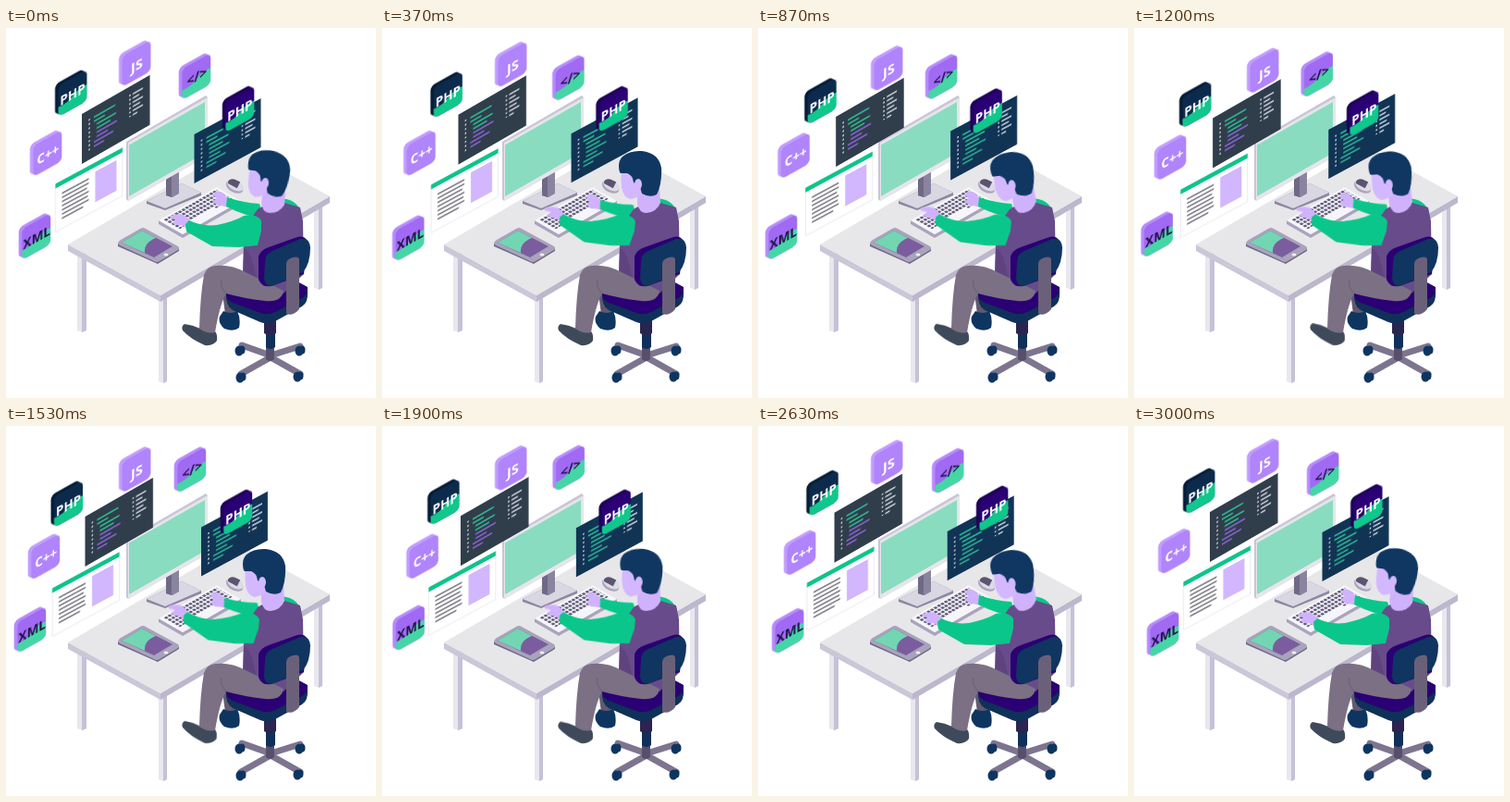
Animation of 400x400 px, one loop 3030 ms. Source, as an HTML page without scripts:

```html
<!DOCTYPE html>
<html lang="en">
<head>
<meta charset="utf-8">
<title>Developer at work</title>
<style>
html, body { margin: 0; width: 100%; height: 100%; overflow: hidden; background: #fff; }
svg { display: block; width: 100vw; height: 100vh; }
text { font: 600 13.5px "Noto Sans", "Open Sans", sans-serif; text-anchor: middle; fill: #fff; }
.ink { fill: #1d1546; }

/* floating parts: half a cycle out, half a cycle back */
.x, .y, .drift { animation: 1515ms cubic-bezier(.37,0,.63,1) infinite alternate; }
.x { animation-name: x; }
.y { animation-name: y; }
.drift { animation-name: drift; }
@keyframes x { from { transform: translateX(var(--a)); } to { transform: translateX(var(--b)); } }
@keyframes y { from { transform: translateY(var(--a)); } to { transform: translateY(var(--b)); } }
@keyframes drift { to { transform: translate(var(--dx), var(--dy)); } }
.wide.x { --a: 1px; --b: -6.6px; animation-delay: -400ms; }
.wide.y { --a: 2px; --b: -7px; animation-delay: -2545ms; }
.slow.x { --a: 2.2px; --b: -4.7px; animation-delay: -600ms; }
.slow.y { --a: 0px; --b: 6.3px; animation-delay: -2850ms; }

.head, .near, .far, .foot { animation: 3030ms ease-in-out infinite; }
.head { animation-name: head; transform-origin: 286px 190px; }
.near { animation-name: near; transform-origin: 270px 218px; }
.far { animation-name: far; transform-origin: 275px 202px; }
.foot { animation-name: foot; transform-origin: 224px 326px; }
@keyframes head {
  0%, 100% { transform: rotate(8deg); }
  12.2%, 50.5%, 73.6% { transform: rotate(0deg); }
  28.7%, 86.8% { transform: rotate(-7deg); }
  62% { transform: rotate(2deg); }
}
@keyframes near {
  0%, 86.8%, 100% { transform: none; }
  12.2%, 73.6% { transform: translate(-3px, 0) rotate(5.5deg); }
}
@keyframes far {
  0%, 28.7%, 86.8%, 100% { transform: none; }
  12.2%, 50.5%, 73.6% { transform: translate(-2px, 1px) rotate(-3deg); }
}
@keyframes foot {
  0%, 19%, 71%, 100% { transform: none; }
  50% { transform: rotate(2deg); }
}

.lilac { --c: #b084fb; --s: #c29cff; }
.mint { --c: #a06af2; --s: #b68bfd; --g: #45d6a6; }
.navy { --c: #0c2b4c; --s: #071d38; --g: #10c78c; }
.plum { --c: #2a0074; --s: #1c0556; --g: #10c78c; }
.line { fill: none; stroke-width: 1.4; }
</style>
</head>
<body>
<svg viewBox="0 0 400 400">
<defs>
  <g id="base">
    <rect x="-3.5" y="-3.5" width="31" height="33.5" rx="5" fill="var(--s)"/>
    <rect x="-1.8" y="-1.8" width="31" height="33.5" rx="5" fill="var(--s)"/>
    <rect width="31" height="33.5" rx="5" fill="var(--c)"/>
  </g>
  <g id="tile">
    <use href="#base"/>
    <path d="M0 23Q8 25 15 20T31 16V28.5a5 5 0 0 1-5 5H5a5 5 0 0 1-5-5Z" fill="var(--g)"/>
  </g>
  <g id="code">
    <path class="line" d="M8 10V46M52 9V33" stroke="#fff" stroke-dasharray="1.6 3"/>
    <path class="line" d="M13 11H36M13 15.5H25M16 20H37M16 24.5H31" stroke="#2fd3a0"/>
    <path class="line" d="M55 10H66M55 14.500H62M55 19H66M55 23.500H63M55 28H66M55 32.500H60" stroke="#dfe5ee"/>
  </g>
  <g id="wheel" fill="#0e3560">
    <ellipse rx="4.5" ry="5.5"/>
    <ellipse cx="3" cy="-1" rx="3.5" ry="4.5"/>
  </g>
</defs>

<!-- desk -->
<path d="M77 243h10v84l-5 2-5-2ZM165 290h9v92l-4 2-5-2ZM333 190h9v91l-4 2-5-2Z" fill="#e8e7ee"/>
<path d="M82 243h5v84l-5 2ZM170 290h4v92l-4 2ZM338 190h4v91l-4 2Z" fill="#c6c1d6"/>
<path d="M67 234 167 289V296L67 241Z" fill="#cbc7d8"/>
<path d="M167 289 350 182V189L167 296Z" fill="#bdb7cd"/>
<path d="M67 234 250 127 350 182 167 289Z" fill="#e7e6e9"/>

<!-- monitor -->
<path d="M152 187 190 168 211 178V181L172 197 152 190Z" fill="#8c86a2"/>
<path d="M152 187 190 168 211 178 172 195Z" fill="#d9d7e2"/>
<path d="M173 160 187 153V179L180 183 173 181Z" fill="#8b849f"/>
<path d="M173 160 179 158V183L173 181Z" fill="#6f6886"/>
<path d="M130 123 216 73 218 75V138L132 187 130 185Z" fill="#c9c5d6"/>
<path d="M132 124 218 75V138L132 187Z" fill="#e6e5ec"/>
<path d="M133 126.500 215 80V135L133 182Z" fill="#89dcc0"/>

<!-- tablet -->
<path d="M121 233 163 252 187 238V241L164 255 121 236Z" fill="#6f6987"/>
<path d="M121 233Q121 231 124 229L145 217Q148 215 151 217L186 236Q188 238 186 240L166 252Q163 254 160 252L123 235Z" fill="#a9a3bb"/>
<path d="M125 232 147 219 180 236 160 248Z" fill="#7b5d9f"/>
<path d="M125 232 147 219 162 227Q149 232 150 243Z" fill="#72d6b2"/>
<ellipse cx="173" cy="245" rx="2.5" ry="1.5" fill="#eeedf4"/>

<!-- keyboard and mouse -->
<path d="M165 208 191 223 254 187V191L191 227 165 212Z" fill="#aaa4bd"/>
<g transform="matrix(.87 -.5 .87 .5 165 208)" fill="none" stroke="#615c79">
  <path d="M0 0H72V30H0Z" fill="#f6f5f9" stroke="none"/>
  <path d="M4 4H69M4 8.500H69M4 13H69M4 17.500H69" stroke-width="3" stroke-dasharray="3 1.300"/>
  <path d="M4 21.500H16M49 21.500H69" stroke-width="2" stroke-dasharray="3 1.300"/>
</g>
<g transform="rotate(28 248 170)">
  <ellipse cx="248" cy="172" rx="10" ry="6" fill="#aaa4bd"/>
  <ellipse cx="248" cy="170" rx="9.500" ry="5.500" fill="#dddae6"/>
  <path d="M239 170Q239 165 247 164.500H251V172H240Z" fill="#5a5470"/>
</g>

<!-- panels -->
<g class="drift" style="--dx:3.5px;--dy:5px">
  <g transform="matrix(1 -.575 0 1 82 93)">
    <path d="M0 0H73.500V54H0Z" fill="#303d4b"/>
    <use href="#code"/>
    <path class="line" d="M16 29H38M16 33.500H28M13 38H34M13 42.500H24" stroke="#9b6af0"/>
  </g>
</g>
<g class="drift" style="--dx:-3.5px;--dy:7px">
  <g transform="matrix(1 -.54 0 1 53.500 168.500)">
    <path d="M0 0H72.500V52H0Z" fill="#fff" stroke="#e5e3ed" stroke-width=".8"/>
    <path d="M0 0H72.500V5H0Z" fill="#0bc58a"/>
    <path d="M43 10H66V43H43Z" fill="#d2b6fe"/>
    <path class="line" d="M7 14H36M7 18.500H36M7 23H34M7 27.500H36M7 32H35M7 36.500H36M7 41H30" stroke="#64626f"/>
  </g>
</g>
<g class="drift" style="--dx:7.5px;--dy:-5.5px">
  <g transform="matrix(1 -.54 0 1 203.500 115)">
    <path d="M0 0H72V53H0Z" fill="#113455"/>
    <use href="#code"/>
    <path class="line" d="M16 29H38M16 33.500H28M13 38H34M13 42.500H24" stroke="#2fc39b"/>
  </g>
</g>

<!-- language tiles -->
<g class="drift navy" style="--dx:-4.5px;--dy:14px">
  <g transform="matrix(1 -.56 0 1 56.500 62.500)"><use href="#tile"/><text x="15.500" y="23.500">PHP</text></g>
</g>
<g class="drift lilac" style="--dx:0px;--dy:8.8px">
  <g transform="matrix(1 -.56 0 1 125.500 30.500)"><use href="#base"/><text x="16" y="24" style="font-size:14.5px">JS</text></g>
</g>
<g class="wide x"><g class="wide y mint">
  <g transform="matrix(1 -.56 0 1 190.500 44.500)"><use href="#tile"/><text class="ink" x="16" y="22.500" style="font-size:14px">&lt;/&gt;</text></g>
</g></g>
<g class="slow x"><g class="slow y lilac">
  <g transform="matrix(1 -.56 0 1 29.500 127.500)"><use href="#base"/><text x="16" y="23">C++</text></g>
</g></g>
<g class="wide x"><g class="wide y mint">
  <g transform="matrix(1 -.56 0 1 17.500 217.500)"><use href="#tile"/><text class="ink" x="16" y="23">XML</text></g>
</g></g>
<g class="slow x"><g class="slow y plum">
  <g transform="matrix(1 -.56 0 1 237.500 79.500)"><use href="#tile"/><text x="15.500" y="23.500">PHP</text></g>
</g></g>

<!-- chair base -->
<path d="M286 354 255 343M286 354 318 344M286 356 254 374M286 356 318 374" stroke="#7d758f" stroke-width="7" stroke-linecap="round"/>
<use href="#wheel" x="252" y="349"/><use href="#wheel" x="317" y="349"/>
<use href="#wheel" x="253" y="378"/><use href="#wheel" x="315" y="377"/>
<path d="M281 328H290V358Q285 362 281 358Z" fill="#584f6d"/>
<path d="M281 314H291V345Q286 349 281 345Z" fill="#0f3157"/>
<path d="M279 314H292V330Q285 334 279 330Z" fill="#2b2450"/>

<!-- far leg and seat -->
<path d="M234 286H252L250 310H237Z" fill="#63596f"/>
<path d="M235 306Q243 310 250 306 254 314 252 324 246 329 236 325 229 319 231 312Z" fill="#0e3560"/>
<path d="M238 287Q237 300 245 305L275 318Q283 321 291 317L320 301Q327 297 326 284L300 272Z" fill="#0f3058"/>
<path d="M238 287Q238 294 245 297L275 308Q283 311 291 307L320 292Q327 288 326 280L300 266Z" fill="#2a0074"/>

<!-- far arm -->
<g class="far">
  <path d="M240 184 234 178Q229 175 225 178L224 181 228 184 224 187Q226 192 232 192L241 194Z" fill="#d0b2fc"/>
  <path d="M239 183Q257 189 274 190L279 206Q260 204 238 193Z" fill="#0bc68a"/>
</g>

<!-- body -->
<path d="M294 184Q314 184 319 199L311 204 292 195Z" fill="#0bc68a"/>
<path d="M272 196Q281 189 301 189L318 194 321 209 322 266 300 287Q273 287 256 272L257 233Q261 209 272 196Z" fill="#684b8a"/>
<path d="M256 272 257 238Q267 242 271 277Z" fill="#5f437f"/>

<!-- near leg -->
<g class="foot">
  <path d="M193 320Q202 321 210 325L225 327Q229 330 228 338 224 344 215 343 199 336 191 327 189 322 193 320Z" fill="#3e4a5a"/>
</g>
<path d="M226 257Q243 255 259 264L300 284Q298 297 280 295 255 292 238 287 231 299 226 329 218 331 209 325 210 289 214 267 217 258 226 257Z" fill="#7b7084"/>
<path d="M238 287Q231 280 233 272" fill="none" stroke="#695e74"/>

<!-- chair back -->
<path d="M273 247Q275 240 284 237L315 226Q323 224 326 231L322 266 287 279Q277 281 273 272Z" fill="#2a0074"/>
<path d="M280 253Q280 244 288 241L318 228Q328 226 329 237 329 255 321 264L290 278Q280 281 279 271Z" fill="#0f3560"/>
<path d="M303 255Q303 250 310 248 317 246 317 251V304Q310 312 303 309Z" fill="#6a6079"/>

<!-- head -->
<g class="head">
  <path d="M276 178 300 172 301 189Q297 199 286 200 278 200 276 190Z" fill="#d0b2fc"/>
  <path d="M259 149Q258 163 259 172 261 183 268 185 278 184 286 176L282 145Z" fill="#d4b8ff"/>
  <path d="M257 156Q254 145 260 139 268 132 281 133 299 135 302 151 303 168 297 180 290 184 281 179L279 172 272 167Q271 159 265 157L258 157Z" fill="#0f3762"/>
  <ellipse cx="277" cy="169" rx="4" ry="6" fill="#d4b8ff"/>
</g>

<!-- near arm -->
<g class="near">
  <path d="M200 209 192 202Q185 200 178 203L177 206 184 207 180 211Q184 214 190 213L198 219Z" fill="#d0b2fc"/>
  <path d="M198 208Q212 215 228 213 247 209 257 203 270 200 276 208L276 219 272 235 252 237 223 236 195 220 194 212 198 208Z" fill="#0bc68a"/>
</g>
</svg>
</body>
</html>
```
